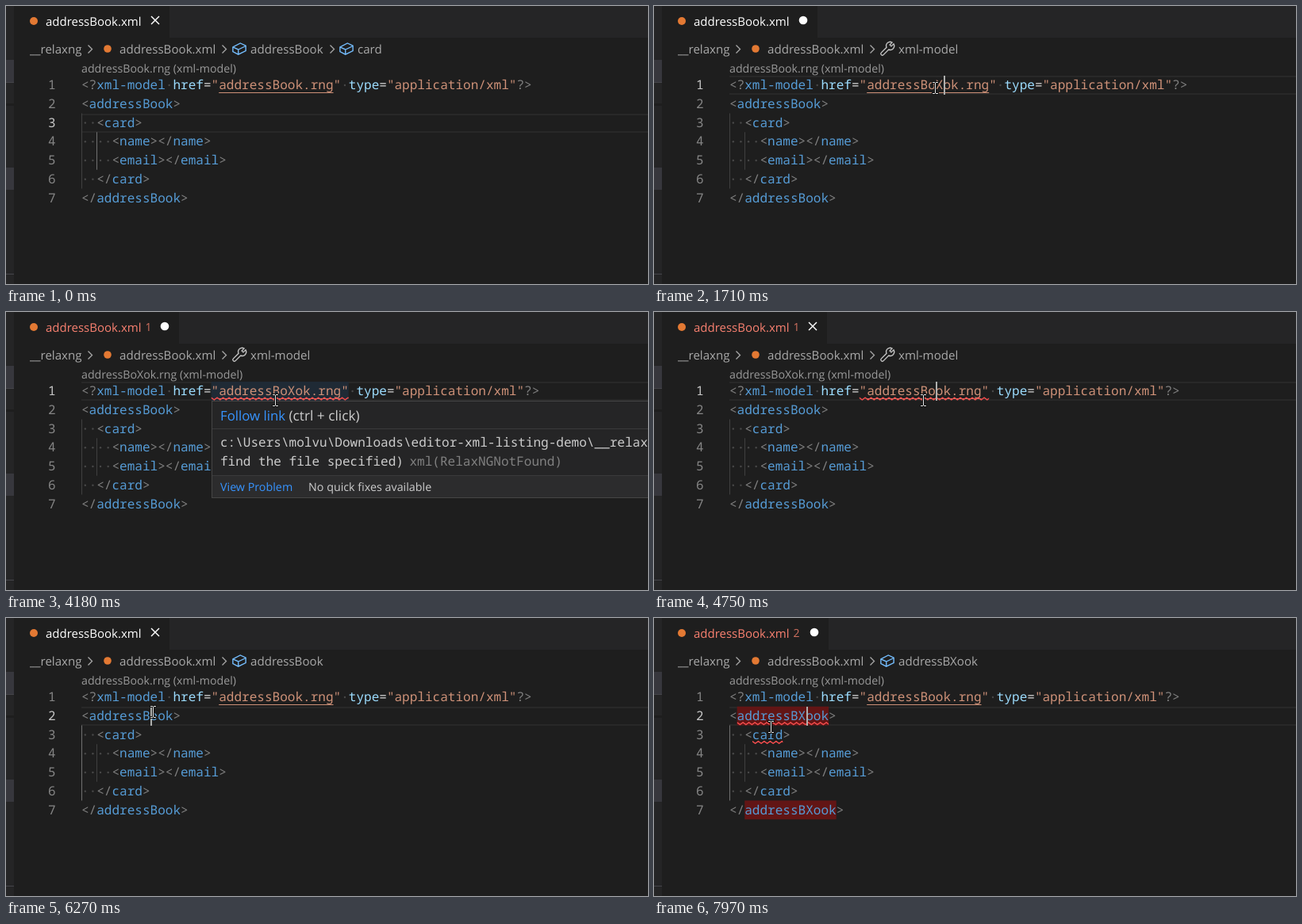
Write an HTML page with a canvas that moves like this. It is 809 px wide and 351 px high and loops after 8 s.

```html
<!DOCTYPE html>
<html lang="en">
<head>
<meta charset="utf-8">
<title>XML editor</title>
<style>
  html, body { margin: 0; width: 100%; height: 100%; overflow: hidden; background: #1e1e1e; }
  canvas { display: block; }
</style>
</head>
<body>
<canvas id="stage" width="809" height="351"></canvas>
<script>
const ctx = document.getElementById('stage').getContext('2d');
ctx.textRendering = 'geometricPrecision';

const W = 809, H = 351, LOOP = 8000;
const CELL = 9.622, ROW = 23.75, LEFT = 95, TOP = 88;
const UI = '"Open Sans", "Noto Sans", sans-serif';
const MONO = '16.04px "Noto Sans Mono", "DejaVu Sans Mono", monospace';
const GREY = '#808080', TAG = '#569cd6', ATTR = '#9cdcfe', STR = '#ce9178',
      PLAIN = '#d4d4d4', CRUMB = '#a9a9a9', ERR = '#f14c4c', FEED = '#e37933';

// Key times in ms
const CLICK1 = 900, CRUMB1 = 1070, TYPE1 = 1710, CHECK1 = 2230, TAB1 = 2380,
      HOVER = 2690, CTRL = 4430, UNDO = 4670, CLEAR = 5190, TABOK = 5350,
      CLICK2 = 6150, CRUMB2 = 6270, LINKED = 6350, TYPE2 = 6810,
      CRUMB3 = 7190, CHECK2 = 7360;

// Caret: from, to, line, column
const carets = [
  [CLICK1, 1400, 0, 27], [TYPE1, 2230, 0, 28], [HOVER, 3160, 0, 28],
  [3710, 4180, 0, 28], [UNDO, 5190, 0, 27], [5690, CLICK2, 0, 27],
  [CLICK2, 6650, 1, 9], [TYPE2, 7360, 1, 10], [7830, LOOP, 1, 10]
];

// Mouse: time, x, y
const mouse = [
  [150, 484, 202], [229, 484, 202], [230, 420, 121], [440, 420, 121],
  [880, 354, 103], [2380, 354, 103], [2540, 353, 103], [2690, 350, 107],
  [2830, 347, 111], [2920, 347, 111], [3010, 339, 111],
  [5450, 339, 111], [5730, 214, 127], [5810, 214, 127],
  [6100, 185, 118], [7800, 185, 118], [7970, 147, 137], [LOOP, 147, 137]
];

const wrench = new Path2D('M12.9 1.6A4 4 0 0 0 7.2 6.6L1.9 11.9A1.55 1.55 0 0 0 4.1 14.1' +
  'L9.4 8.8A4 4 0 0 0 14.4 3.1L12 5.5L10.5 4Z');
const cube = new Path2D('M1.5 6.3L9 2.4L14.5 5V10L7 13.7L1.5 10.9ZL7 8.8L14.5 5.2M7 8.8V13.7');

const within = (t, a, b) => t >= a && t < b;
const colX = col => LEFT + col * CELL;
const rowY = row => TOP + row * ROW;

function rect(x, y, w, h, color) {
  ctx.fillStyle = color;
  ctx.fillRect(x, y, w, h);
}

function dot(x, y, r, color) {
  ctx.fillStyle = color;
  ctx.beginPath();
  ctx.arc(x, y, r, 0, Math.PI * 2);
  ctx.fill();
}

function poly(points, color, width) {
  ctx.strokeStyle = color;
  ctx.lineWidth = width;
  ctx.beginPath();
  points.forEach(([x, y]) => ctx.lineTo(x, y));
  ctx.stroke();
}

function label(text, x, y, size, color) {
  ctx.font = size + 'px ' + UI;
  ctx.fillStyle = color;
  ctx.fillText(text, x, y);
}

function mono(text, x, y, color) {
  ctx.font = MONO;
  ctx.fillStyle = color;
  [...text].forEach((ch, i) => { if (ch !== ' ') ctx.fillText(ch, x + i * CELL, y); });
}

function icon(path, x, color) {
  ctx.save();
  ctx.translate(x, 44);
  ctx.scale(1.25, 1.25);
  ctx.strokeStyle = color;
  ctx.lineWidth = 1.1;
  ctx.stroke(path);
  ctx.restore();
}

function squiggle(row, col, count) {
  const x0 = colX(col), x1 = colX(col + count), y = rowY(row) + ROW;
  ctx.save();
  ctx.beginPath();
  ctx.rect(x0, y - 5, x1 - x0, 6);
  ctx.clip();
  const points = [];
  for (let x = x0, i = 0; x <= x1 + 4; x += 3.75, i++) points.push([x, y - (i % 2 ? 0.9 : 3.6)]);
  poly(points, ERR, 1.3);
  ctx.restore();
}

// Draws [text, color] pairs on the code grid
function code(row, col, parts) {
  for (let i = 0; i < col; i++) space(row, i);
  for (const [text, color] of parts) {
    if (text === ' ') space(row, col);
    else mono(text, colX(col), rowY(row) + 17.2, color);
    col += text.length;
  }
}

function space(row, col) {
  dot(colX(col) + CELL / 2, rowY(row) + 12, 1.2, '#484848');
}

const open = name => [['<', GREY], [name, TAG], ['>', GREY]];
const close = name => [['</', GREY], [name, TAG], ['>', GREY]];

function drawSidebar() {
  rect(0, 0, 10, H, '#252526');
  rect(0, 68, 10, 28, '#37373d');
  rect(0, 96, 10, 1, '#45454a');
  rect(0, 123, 10, 3, '#1e1e1e');
  rect(0, 204, 10, 28, '#37373d');
  rect(0, 338, 10, 1, '#45454a');
}

function drawTab(t) {
  const errors = within(t, TAB1, TABOK) ? 1 : t >= CHECK2 ? 2 : 0;
  const dirty = within(t, TYPE1, UNDO) || t >= TYPE2;
  const shift = [0, 12, 14][errors];
  rect(10, 0, W - 10, 40, '#252526');
  rect(10, 0, 196 + shift, 40, '#1e1e1e');
  dot(35, 19, 5, FEED);
  label('addressBook.xml', 50, 25, 15, errors ? '#f88070' : '#ffffff');
  if (errors) label(errors, 175.5, 24, 14, '#d0705f');
  const x = 188 + shift;
  if (dirty) return dot(x, 18, 5.3, '#ffffff');
  poly([[x - 5, 13], [x + 5, 23]], '#ffffff', 1.4);
  poly([[x - 5, 23], [x + 5, 13]], '#ffffff', 1.4);
}

function chevron(x) {
  poly([[x - 2.5, 49.5], [x + 2.5, 54.5], [x - 2.5, 59.5]], CRUMB, 1.3);
}

function crumb(text, x) {
  label(text, x, 60, 15.1, CRUMB);
}

function drawCrumbs(t) {
  crumb('__relaxng', 30);
  chevron(106);
  dot(128, 54, 4.8, FEED);
  crumb('addressBook.xml', 143);
  chevron(275);
  if (within(t, CRUMB1, CRUMB2)) {
    icon(wrench, 284, '#c5c5c5');
    crumb('xml-model', 308);
    return;
  }
  icon(cube, 284, '#75beff');
  crumb(t >= CRUMB3 ? 'addressBXook' : 'addressBook', 308);
  if (t < CRUMB1) {
    chevron(411);
    icon(cube, 419, '#75beff');
    crumb('card', 443);
  }
}

function drawEditor(t) {
  const active = t < CLICK1 ? 2 : t < CLICK2 ? 0 : 1;
  const file = within(t, TYPE1, UNDO) ? 'addressBoXok.rng' : 'addressBook.rng';
  const lens = within(t, CHECK1, CLEAR) ? 'addressBoXok.rng' : 'addressBook.rng';
  const root = t >= TYPE2 ? 'addressBXook' : 'addressBook';
  const link = within(t, CTRL, UNDO) ? '#4e94ce' : STR;

  label(lens + ' (xml-model)', LEFT, 84, 14.2, '#999999');

  const y = Math.round(rowY(active));
  rect(LEFT, y, W - LEFT, 2, '#282828');
  rect(LEFT, y + 22, W - LEFT, 2, '#282828');

  if (within(t, HOVER, UNDO)) rect(colX(17), TOP, 18 * CELL, 24, '#1f2a35');
  if (t >= LINKED) {
    rect(colX(1), rowY(1), root.length * CELL, ROW, '#621515');
    rect(colX(2), rowY(6), root.length * CELL, ROW, '#621515');
  }

  rect(95, rowY(2), 1, ROW * 4, active === 1 ? '#707070' : '#404040');
  rect(114, rowY(3), 1, ROW * 2, active === 2 ? '#707070' : '#404040');

  for (let i = 0; i < 7; i++)
    mono(String(i + 1), 53, rowY(i) + 17.2, i === active ? '#c6c6c6' : '#858585');

  code(0, 0, [
    ['<?', GREY], ['xml-model', TAG], [' ', GREY], ['href', ATTR], ['=', PLAIN],
    ['"', STR], [file, link], ['"', STR], [' ', GREY],
    ['type', ATTR], ['=', PLAIN], ['"application/xml"', STR], ['?>', GREY]
  ]);
  code(1, 0, open(root));
  code(2, 2, open('card'));
  code(3, 4, [...open('name'), ...close('name')]);
  code(4, 4, [...open('email'), ...close('email')]);
  code(5, 2, close('card'));
  code(6, 0, close(root));

  rect(colX(18), 109, file.length * CELL, 1, link);
  if (within(t, CHECK1, CLEAR)) squiggle(0, 17, file.length + 2);
  if (t >= CHECK2) {
    squiggle(1, 1, root.length);
    squiggle(2, 3, 4);
  }

  const caret = carets.find(c => within(t, c[0], c[1]));
  if (caret) rect(Math.round(colX(caret[3]) + 0.3), Math.round(rowY(caret[2])), 2, 24, '#aeafad');
}

function drawHover(t) {
  if (!within(t, HOVER, UNDO)) return;
  ctx.globalAlpha = Math.min(1, Math.max(0, (t - 2720) / 140));
  rect(259, 112, W - 259, 123, '#454545');
  rect(260, 113, W - 260, 121, '#252526');
  rect(260, 147, W - 260, 1, '#3a3a3b');
  rect(260, 206, W - 260, 28, '#2c2c2d');
  rect(260, 206, W - 260, 1, '#3a3a3b');
  label('Follow link', 270, 137, 16.8, '#3794ff');
  label('(ctrl + click)', 356.5, 137, 17.3, '#cccccc');
  mono('c:\\Users\\molvu\\Downloads\\editor-xml-listing-demo\\__relaxng', 270, 170, '#cccccc');
  mono('find the file specified)', 270, 194, '#cccccc');
  mono('xml(RelaxNGNotFound)', 508.5, 194, '#808080');
  label('View Problem', 270, 226, 14.3, '#3794ff');
  label('No quick fixes available', 381, 226, 14.3, '#cccccc');
  ctx.globalAlpha = 1;
}

function drawMouse(t) {
  const i = mouse.findIndex(p => p[0] > t);
  if (i < 1) return;
  const [t0, x0, y0] = mouse[i - 1], [t1, x1, y1] = mouse[i];
  const k = (t - t0) / (t1 - t0);
  const x = Math.round(x0 + (x1 - x0) * k), y = Math.round(y0 + (y1 - y0) * k);
  for (const [color, pad] of [['#111111', 1], ['#e8e8e8', 0]]) {
    const bar = (dx, dy, w, h) => rect(x + dx - pad, y + dy - pad, w + pad * 2, h + pad * 2, color);
    bar(-3, -7, 3, 1);
    bar(1, -7, 3, 1);
    bar(0, -6, 1, 13);
    bar(-3, 7, 3, 1);
    bar(1, 7, 3, 1);
  }
}

function frame() {
  const t = performance.now() % LOOP;
  rect(0, 0, W, H, '#1e1e1e');
  drawSidebar();
  drawTab(t);
  drawCrumbs(t);
  drawEditor(t);
  drawHover(t);
  drawMouse(t);
  requestAnimationFrame(frame);
}
frame();
</script>
</body>
</html>
```
